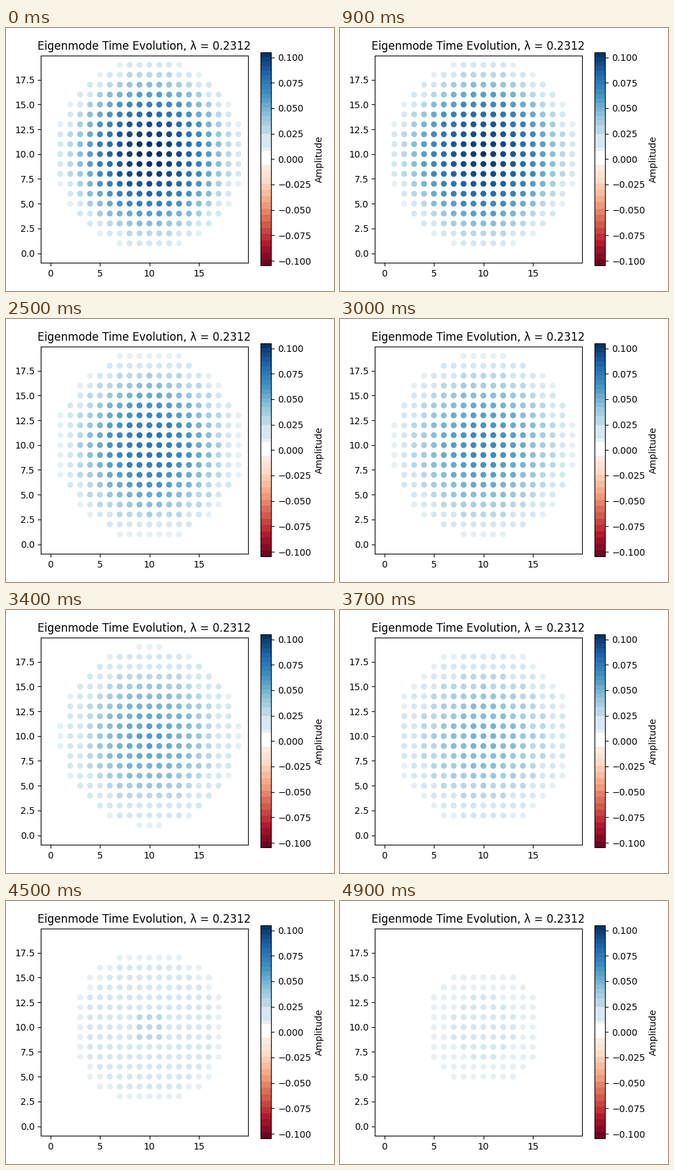
Animation of 500 by 400 pixels, one loop 5000 ms. Source, as a matplotlib script:

```python
import numpy as np
import matplotlib.pyplot as plt
from matplotlib.animation import FuncAnimation
from matplotlib.colors import ListedColormap

FRAMES, INTERVAL = 50, 100
EIGENVALUE = 0.2312
DURATION = 3.0
PEAK = 0.1047
FAINT = 0.074 * PEAK  # weaker positive amplitudes look white


def ground_mode(x, y, center=10, radius=10):
    """Lowest mode of the five-point Laplacian on a disc, zero outside."""
    inside = (x - center) ** 2 + (y - center) ** 2 < radius ** 2
    px, py = x[inside], y[inside]
    steps = abs(px[:, None] - px) + abs(py[:, None] - py)
    laplacian = 4.0 * np.eye(len(px)) - (steps == 1)
    mode = np.zeros(x.shape)
    mode[inside] = abs(np.linalg.eigh(laplacian)[1][:, 0])
    return mode * PEAK / mode.max()


def banded_map(levels=1024):
    """Red-to-blue map in flat bands with a white middle."""
    edges = np.concatenate([
        np.linspace(-PEAK, -0.0055, 17),
        [FAINT, 0.0115, 0.0245],
        np.linspace(0.033, PEAK, 17),
    ])
    values = (np.arange(levels) + 0.5) / levels * 2 * PEAK - PEAK
    band = np.clip(np.searchsorted(edges, values) - 1, 0, len(edges) - 2)
    middles = (edges[:-1] + edges[1:]) / 2
    colors = plt.get_cmap("RdBu")(middles[band] / (2 * PEAK) + 0.5)
    colors[(values > -0.0055) & (values < FAINT)] = 1
    return ListedColormap(colors)


y, x = (axis.ravel() for axis in np.mgrid[:20, :20])
mode = ground_mode(x, y)

fig, ax = plt.subplots(figsize=(5, 4), dpi=100)
dots = ax.scatter(x, y, c=mode, s=30, cmap=banded_map(), vmin=-PEAK, vmax=PEAK)
ax.set_aspect("equal")
ax.set_title(f"Eigenmode Time Evolution, λ = {EIGENVALUE}")
fig.colorbar(dots, ax=ax, label="Amplitude")
fig.tight_layout()


def update(frame):
    time = DURATION * frame / (FRAMES - 1)
    dots.set_array(mode * np.cos(np.sqrt(EIGENVALUE) * time))
    return [dots]


anim = FuncAnimation(fig, update, frames=FRAMES, interval=INTERVAL,
                     repeat=True, repeat_delay=0)
plt.show()
```
